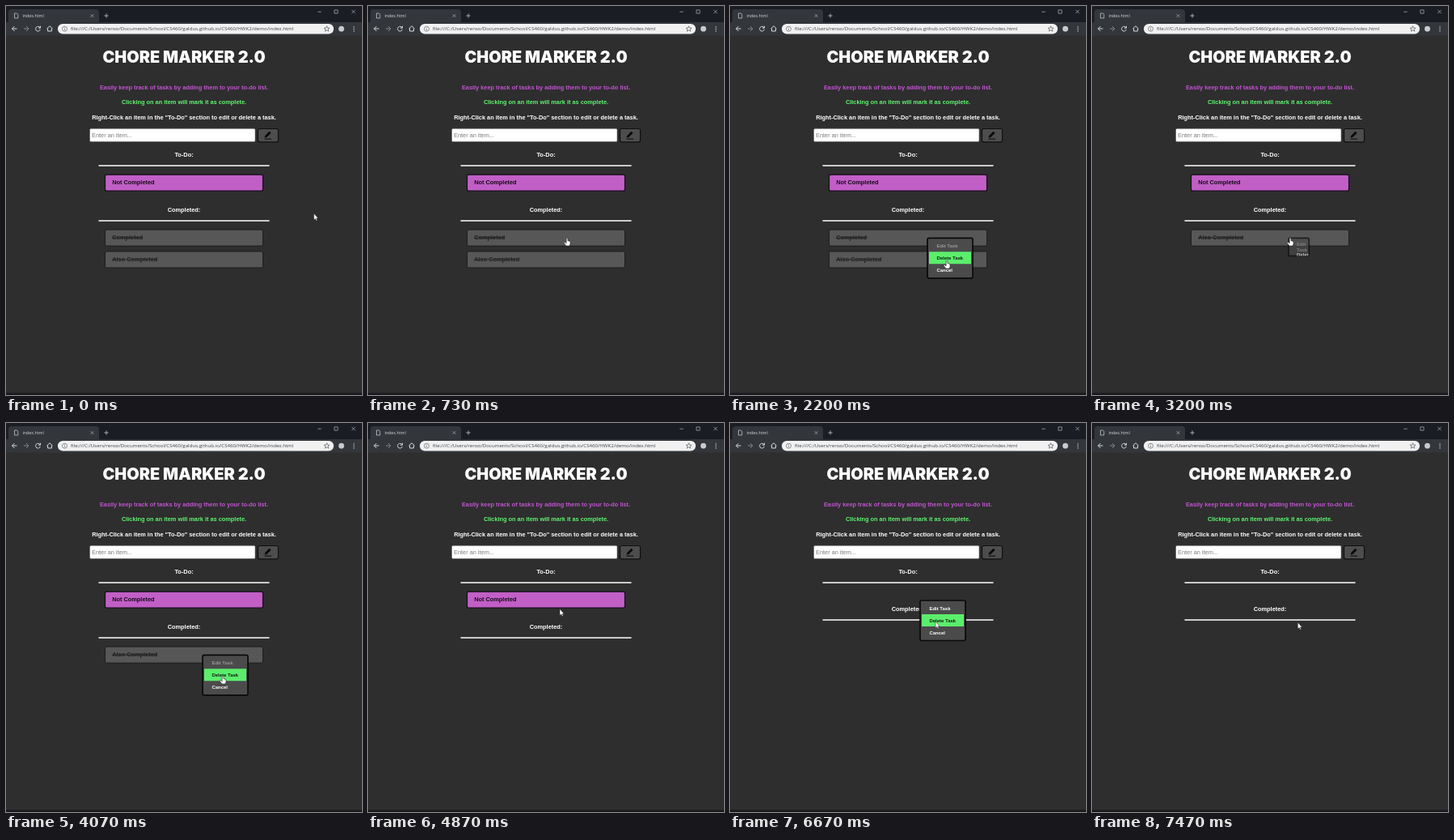
Animation of 440x480 px, one loop 7540 ms. Source, as an HTML page with a canvas:

```html
<!DOCTYPE html>
<html lang="en">
<head>
<meta charset="utf-8">
<title>Task list</title>
<style>
  html, body { margin: 0; width: 100%; height: 100%; overflow: hidden; background: #2e2e2e; }
  canvas { display: block; }
</style>
</head>
<body>
<canvas id="stage" width="440" height="480"></canvas>
<script>
const ctx = document.getElementById('stage').getContext('2d');
const LOOP = 7540;
const SANS = '"Liberation Sans", Arial, sans-serif';
const UI = '"Open Sans", "Noto Sans", sans-serif';
const BODY = 7.36;

// Pointer path: time, x, y of the hot spot
const PATH = [
  [0, 380.5, 256], [730, 246, 286], [930, 246, 286], [1130, 243, 285], [1250, 243, 285],
  [1730, 268, 314], [2400, 268, 314], [2950, 245, 286], [3350, 245, 286], [3800, 268, 312],
  [4300, 268, 312], [4870, 237, 229.5], [5150, 234, 219], [5450, 235, 219], [5800, 245, 224],
  [5950, 245, 224], [6330, 254, 245], [7400, 254, 245], [7470, 254.3, 246]
];

// Context menus: each one ends by deleting its task
const MENUS = [
  { open: 1150, close: 2320, x: 243, y: 285.3, editable: false },
  { open: 3105, close: 4270, x: 242, y: 285.3, editable: false },
  { open: 5200, close: 6670, x: 234, y: 218, editable: true }
];
const MENU_W = 58, MENU_H = 51.5, MENU_FADE = 200;

const clamp = v => Math.max(0, Math.min(1, v));
const swing = p => 0.5 - Math.cos(Math.PI * clamp(p)) / 2;
const inside = (p, r) => p.x >= r.x && p.x <= r.x + r.w && p.y >= r.y && p.y <= r.y + r.h;

function rect(x, y, w, h, fill, radius = 0, stroke, line = 1) {
  ctx.beginPath();
  ctx.roundRect(x, y, w, h, radius);
  if (fill) { ctx.fillStyle = fill; ctx.fill(); }
  if (stroke) { ctx.strokeStyle = stroke; ctx.lineWidth = line; ctx.stroke(); }
}

function text(str, x, middle, color, { size = BODY, weight = 'bold', family = SANS, align = 'left' } = {}) {
  ctx.font = `${weight} ${size}px ${family}`;
  ctx.textAlign = align;
  ctx.fillStyle = color;
  ctx.fillText(str, x, middle + size * 0.36);
}

const centered = (str, y, color = '#fff') => text(str, 220, y, color, { align: 'center' });

function shape(d, x, y, { fill, stroke, line = 1 } = {}) {
  const path = new Path2D(d);
  ctx.save();
  ctx.translate(x, y);
  ctx.lineJoin = 'round';
  if (fill) { ctx.fillStyle = fill; ctx.fill(path); }
  if (stroke) { ctx.strokeStyle = stroke; ctx.lineWidth = line; ctx.stroke(path); }
  ctx.restore();
}

function pointerAt(t) {
  const last = PATH.length - 1;
  const next = PATH.findIndex(key => key[0] > t);
  const i = next < 0 ? last : next;
  const a = PATH[i - 1], b = PATH[i];
  const p = swing((t - a[0]) / (b[0] - a[0]));
  return { x: a[1] + (b[1] - a[1]) * p, y: a[2] + (b[2] - a[2]) * p };
}

function drawBrowser() {
  const icon = { stroke: '#dadce0', line: 1 };
  const control = { stroke: '#b4b6ba', line: 0.7 };
  rect(0, 0, 440, 480, '#2e2e2e');
  rect(0, 0, 440, 21, '#1b1d24');
  rect(3, 4, 112, 20, '#33363b', [4, 4, 0, 0]);
  rect(0, 20, 440, 16.5, '#33363b');
  rect(0, 477.5, 440, 2.5, '#1c191d');

  shape('M-2-3H1L2.3-1.7V3H-2Z', 12.5, 12, { stroke: '#d5d7da', line: 0.7 });
  text('index.html', 20.5, 12, '#d5d7da', { size: 5.3, weight: 'normal', family: UI });
  shape('M-1.8-1.8 1.8 1.8M1.8-1.8-1.8 1.8', 106.5, 12, control);
  shape('M-2.6 0H2.6M0-2.6V2.6', 124, 12, { stroke: '#b4b6ba', line: 0.9 });
  shape('M-2.2 0H2.2', 387.5, 7.2, control);
  shape('M-2.1-2.1H2.1V2.1H-2.1Z', 408, 7, control);
  shape('M-2.2-2.2 2.2 2.2M2.2-2.2-2.2 2.2', 429.5, 7, control);

  shape('M3 0H-3M0-3-3 0 0 3', 10.5, 28, icon);
  shape('M-3 0H3M0-3 3 0 0 3', 25, 28, { stroke: '#83868b', line: 1 });
  shape('M2.4-1.5A2.9 2.9 0 1 0 2.8 1M3-3.3V-.8H.5', 39.5, 28, icon);
  shape('M-3.5 0 0-3.3 3.5 0M-2.4-.5V3H2.4V-.5', 54, 28, icon);

  rect(64, 22, 341, 12.5, '#f1f1f2', 6.2);
  shape('M3 0A3 3 0 1 1-3 0A3 3 0 1 1 3 0M0-.5V1.7M0-1.8V-1', 72.5, 28.2, { stroke: '#63666b', line: 0.7 });
  text('file:///C:/Users/renso/Documents/School/CS460/galdus.github.io/CS460/HWK2/demo/index.html',
    80, 28, '#404348', { size: 6.15, weight: 'normal', family: UI });
  shape('M0-3.5 1-1.1 3.5-1 1.5.6 2.2 3 0 1.6-2.2 3-1.5.6-3.5-1-1-1.1Z', 396.5, 28.2, { stroke: '#55585d', line: 0.7 });
  ctx.beginPath();
  ctx.arc(414.5, 28.2, 3.4, 0, 7);
  ctx.fillStyle = '#c9cbcf';
  ctx.fill();
  for (const dy of [-2.5, 0, 2.5]) rect(429.4, 27.7 + dy, 1.2, 1.2, '#dadce0');
}

function drawHeader() {
  text('CHORE MARKER 2.0', 220, 63, '#fff', { size: 19.9, weight: 900, family: 'Inter, sans-serif', align: 'center' });
  centered('Easily keep track of tasks by adding them to your to-do list.', 100.2, '#c353d3');
  centered('Clicking on an item will mark it as complete.', 118.8, '#5ff56f');
  centered('Right-Click an item in the "To-Do" section to edit or delete a task.', 137.2);

  rect(103.5, 151.3, 204.5, 16.2, '#fff', 1.5, '#555', 0.6);
  text('Enter an item...', 106, 159.2, '#7a7a7a', { weight: 'normal' });
  rect(311.5, 151.5, 25, 16.3, '#4d4d4d', 2, '#101010', 1.2);
  shape('M-4 3.2-3.2.7 2-4.5 4-2.5-1.3 2.6Z', 323.5, 159.3, { fill: '#080808' });
  shape('M-4 4.8H4.5', 323.5, 159.3, { stroke: '#080808' });
}

function drawSection(title, y) {
  centered(title, y);
  rect(114.5, y + 13.2, 211, 1.5, '#fff');
}

function drawTask({ x, y, w, h, label, done, hot }) {
  const fill = done ? '#575757' : hot ? '#a94cad' : '#c15fc6';
  rect(x + 0.5, y + 0.5, w - 1, h - 1, fill, 2, done ? '#1a1a1a' : '#150c18', done ? 0.9 : 1.2);
  const color = done ? '#202020' : '#160a18';
  text(label, x + 9.2, y + 10.1, color);
  if (done) rect(x + 9.2, y + 10, ctx.measureText(label).width, 0.8, color);
}

function drawMenu({ x, y, editable }, scale, pointer) {
  const w = MENU_W * scale, h = MENU_H * scale;
  const rows = ['Edit Task', 'Delete Task', 'Cancel'];
  const ink = i => i === 0 && !editable ? '#999' : '#fff';
  ctx.save();
  ctx.globalAlpha = Math.sqrt(scale);
  rect(x + 1, y + 1, Math.max(0, w - 2), Math.max(0, h - 2), '#4b4b4b', 2, '#0a0a0a', 1.7);
  ctx.clip();
  if (w < 50) {
    // Labels wrap while the box is narrow
    rows.join(' ').split(' ').forEach((word, i) =>
      text(word, x + 11, y + 9 + i * 6.5, ink(i < 2 ? 0 : 1), { size: 5.95 }));
  } else {
    const hovered = Math.floor((pointer.y - y - 3) / 15);
    rows.forEach((label, i) => {
      const hot = i === hovered && (i > 0 || editable);
      if (hot) rect(x + 3, y + 3 + i * 15, w - 6, 15, '#5bee6c');
      text(label, x + 12.5, y + 10.4 + i * 15, hot ? '#102013' : ink(i), { size: 5.95 });
    });
  }
  ctx.restore();
}

function drawPointer({ x, y }, hand) {
  if (hand) {
    shape('M-.9.7Q0-.6.9.7V3.6L2.3 3.9 4 4.7V7.4L3 10H-1.2L-3.8 6.3Q-3.7 4.8-2.3 5.6L-.9 6.8Z',
      x, y, { fill: '#fff', stroke: '#222', line: 0.6 });
  } else {
    shape('M0 0V8L1.8 6.4 3 9 4.2 8.4 3.1 5.9H5.4Z', x, y, { fill: '#fff', stroke: '#222', line: 0.5 });
  }
}

function draw(t) {
  const pointer = pointerAt(t);
  const menu = MENUS.find(m => t >= m.open && t < m.close + MENU_FADE);
  const scale = menu ? swing((t - menu.open) / MENU_FADE) * (1 - swing((t - menu.close) / MENU_FADE)) : 0;
  const overMenu = menu && t < menu.close && inside(pointer, { x: menu.x, y: menu.y, w: MENU_W, h: MENU_H });

  const deleted = MENUS.map(m => t >= m.close);
  const completedY = deleted[2] ? 229 : 251;
  const box = { x: 122, w: 196, h: 21 };
  const tasks = [];
  if (!deleted[2]) tasks.push({ ...box, y: 207.7, label: 'Not Completed' });
  ['Completed', 'Also Completed'].filter((_, i) => !deleted[i]).forEach((label, i) =>
    tasks.push({ ...box, y: completedY + 24.6 + i * 26.8, label, done: true }));
  for (const task of tasks) task.hot = inside(pointer, task) || (overMenu && menu.editable);

  drawBrowser();
  drawHeader();
  drawSection('To-Do:', 183);
  drawSection('Completed:', completedY);
  tasks.forEach(drawTask);
  if (scale > 0.02) drawMenu(menu, scale, pointer);
  drawPointer(pointer, overMenu || tasks.some(task => inside(pointer, task)));
}

function tick() {
  draw(performance.now() % LOOP);
  requestAnimationFrame(tick);
}
tick();
</script>
</body>
</html>
```
